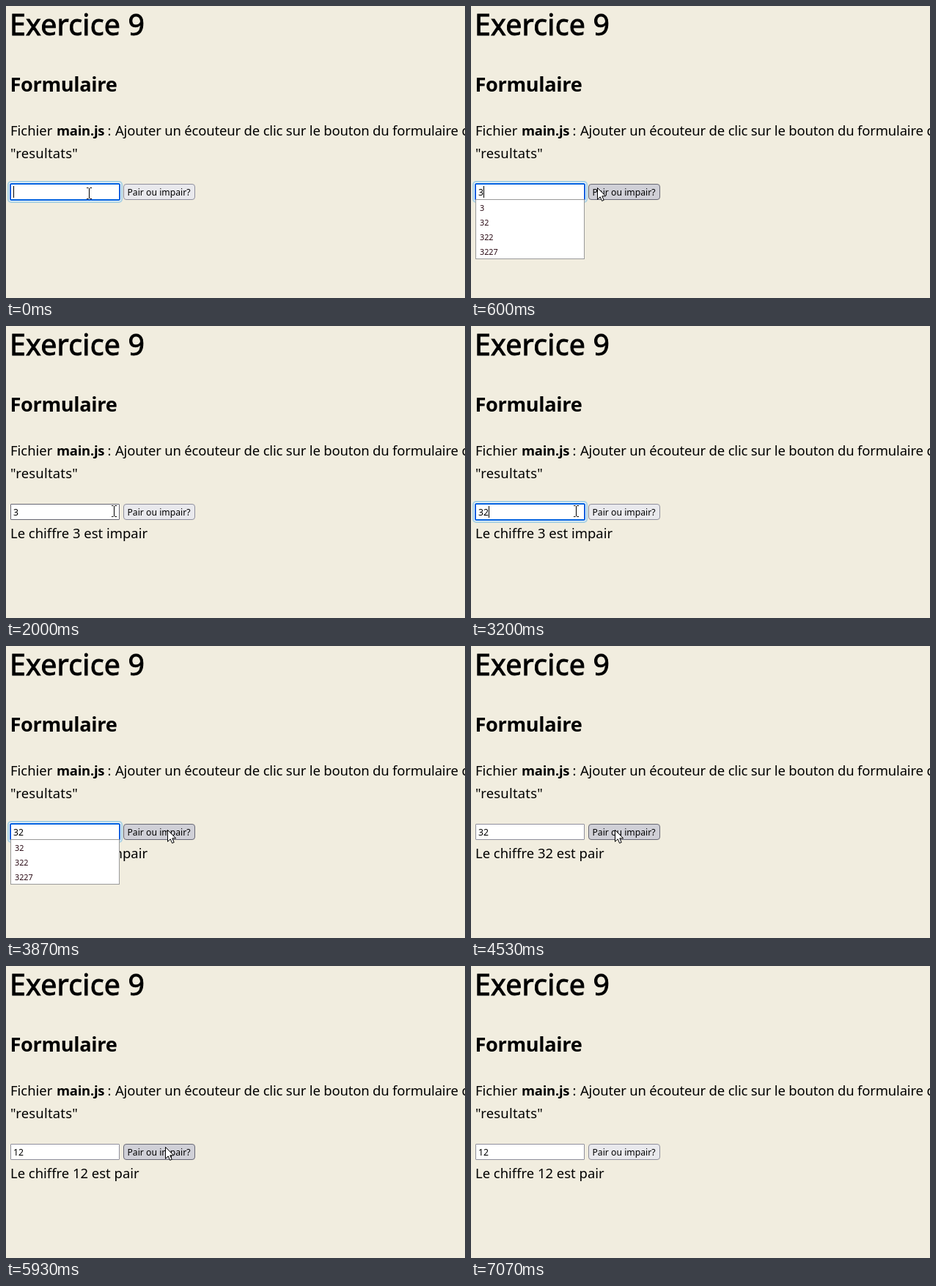
Write an HTML page that moves like this. It is 626 px wide and 399 px high and loops after 7.39 s.

```html
<!DOCTYPE html>
<html lang="fr">
<head>
<meta charset="utf-8">
<title>Exercice 9</title>
<style>
  html, body { margin: 0; width: 100%; height: 100%; overflow: hidden; background: #f1eddf; }
  svg { display: block; cursor: default; }
  text { font-family: "Noto Sans", "Open Sans", sans-serif; font-variant-ligatures: none; white-space: pre; }
  .title { font-size: 39.3px; letter-spacing: .2px; stroke: #000; stroke-width: .9px; }
  .subtitle { font-size: 27.2px; font-weight: 600; letter-spacing: -.36px; }
  .body { font-size: 18.45px; }
  .ui { font-size: 12.2px; }
  .item { font-size: 10.8px; fill: #2a0a14; }
</style>
</head>
<body>
<svg width="626" height="399" viewBox="0 0 626 399">
  <rect width="626" height="399" fill="#f1eddf"/>
  <text class="title" x="5" y="40">Exercice 9</text>
  <text class="subtitle" x="5.5" y="117">Formulaire</text>
  <text class="body" x="6" y="177">Fichier <tspan x="69" font-weight="600" letter-spacing="-.25">main.js</tspan><tspan x="138.6">: </tspan><tspan x="149" letter-spacing="-.16">Ajouter un écouteur de clic sur le bouton du formulaire de la page</tspan></text>
  <text class="body" x="6" y="208" letter-spacing=".22">"resultats"</text>
  <text class="body" id="result" x="6" y="290"></text>

  <g id="ring">
    <rect x="2" y="239" width="157" height="30" rx="5" fill="#a8d0e3"/>
    <rect x="4" y="241" width="153" height="26" rx="3" fill="#fff"/>
  </g>
  <rect id="field" fill="#fff"/>
  <rect id="mark" x="10" y="246" width="14" height="16" fill="#0078d7"/>
  <text class="ui" id="value" x="10" y="259"></text>
  <rect id="caret" y="246" width="1" height="16"/>

  <rect id="button" x="160.5" y="243.5" width="97" height="21" rx="3.5"/>
  <text class="ui" x="165.5" y="259">Pair ou impair?</text>

  <g id="list">
    <rect id="panel" x="6.5" y="264.5" width="148" fill="#fff" stroke="#9a9a9a"/>
    <text class="item" x="12" y="280"></text>
    <text class="item" x="12" y="300"></text>
    <text class="item" x="12" y="320"></text>
    <text class="item" x="12" y="340"></text>
  </g>

  <path id="arrow" d="M.5 .5V16.3L4.2 12.8L6.6 18.4L9.2 17.3L6.8 11.8H11.7Z" fill="#fff" stroke="#000"/>
  <path id="beam" d="M-3 -7.5H-.5M1.5 -7.5H4M-3 7.5H-.5M1.5 7.5H4M.5 -7V7" fill="none" stroke="#000"/>
</svg>
<script>
const LOOP = 7390;
const $ = id => document.getElementById(id);
const beam = (x, y) => ({ pointer: "beam", x, y });
const arrow = (x, y) => ({ pointer: "arrow", x, y });
const press = { button: "active", focus: false, caret: false, list: [] };
const release = result => ({ button: "hover", result });
const over = { button: "hover" };
const out = { button: "idle" };

// Each step: start time, then the properties that change.
const steps = [
  [0, { value: "", focus: true, caret: true, selected: false, list: [], result: "", ...out, ...beam(113, 256) }],
  [270, { value: "3", list: ["3", "32", "322", "3227"] }],
  [400, beam(117, 255)],
  [470, beam(136, 253)],
  [530, arrow(157, 250)],
  [600, { ...arrow(172, 248), ...over }],
  [670, arrow(181, 247)],
  [730, arrow(185, 247)],
  [800, { ...arrow(186, 247), caret: false }],
  [1070, press],
  [1130, release("Le chiffre 3 est impair")],
  [1870, arrow(181, 248)],
  [1930, { ...arrow(157, 248), ...out }],
  [2000, beam(147, 253)],
  [2070, beam(143, 253)],
  [2330, { focus: true, caret: true }],
  [2870, { caret: false }],
  [3200, { value: "32", caret: true }],
  [3270, { list: ["32", "322", "3227"] }],
  [3330, arrow(168, 252)],
  [3400, { ...arrow(206, 252), ...over }],
  [3730, { caret: false }],
  [3800, arrow(217, 251)],
  [3870, arrow(220, 251)],
  [3930, press],
  [4000, release("Le chiffre 32 est pair")],
  [4530, arrow(196, 251)],
  [4600, { ...beam(108, 254), ...out }],
  [4670, beam(24, 255)],
  [4870, { focus: true, caret: true }],
  [4930, { caret: false, selected: true }],
  [5000, beam(27, 255)],
  [5200, beam(112, 254)],
  [5270, arrow(181, 252)],
  [5330, { ...arrow(204, 249), ...over }],
  [5400, arrow(214, 247)],
  [5470, { ...arrow(217, 247), value: "1", selected: false, caret: true, list: ["1", "12"] }],
  [5600, { value: "12", list: ["12"] }],
  [5670, { list: [] }],
  [5870, press],
  [5930, release("Le chiffre 12 est pair")],
  [6270, arrow(212, 248)],
  [6330, arrow(194, 251)],
  [6400, { ...arrow(168, 256), ...out }],
  [6470, beam(141, 261)],
  [6530, arrow(121, 266)],
  [6600, beam(109, 284)],
  [6670, arrow(101, 298)],
  [6730, arrow(96, 318)],
  [6800, arrow(92, 340)],
  [6870, arrow(89, 361)],
  [6930, arrow(87, 380)],
  [7000, arrow(86, 395)],
  [7070, { pointer: "" }]
];

const buttonColors = {
  idle: ["#e9e9ed", "#8f8f9d"],
  hover: ["#d0d0d7", "#676774"],
  active: ["#b1b1b9", "#484851"]
};
const items = document.querySelectorAll(".item");

function set(el, attrs) {
  for (const k in attrs) el.setAttribute(k, attrs[k]);
}
function show(id, on) {
  $(id).style.display = on ? "" : "none";
}

function draw(s) {
  $("result").textContent = s.result;
  $("value").textContent = s.value;
  set($("value"), { fill: s.selected ? "#fff" : "#000" });

  const overField = s.pointer === "beam" && s.y < 266;
  set($("field"), s.focus
    ? { x: 6, y: 243, width: 149, height: 22, rx: 1.5, stroke: "#0060df", "stroke-width": 2 }
    : { x: 6.5, y: 243.5, width: 148, height: 21, rx: .5, stroke: overField ? "#676774" : "#8f8f9d", "stroke-width": 1 });
  show("ring", s.focus);
  show("mark", s.selected);
  show("caret", s.caret);
  set($("caret"), { x: 10 + 7 * s.value.length });

  const [fill, stroke] = buttonColors[s.button];
  set($("button"), { fill, stroke });

  show("list", s.list.length);
  set($("panel"), { height: 20 * s.list.length + 1 });
  items.forEach((el, i) => el.textContent = s.list[i] || "");

  for (const id of ["arrow", "beam"]) {
    show(id, s.pointer === id);
    set($(id), { transform: `translate(${s.x} ${s.y})` });
  }
}

let last = -1;
function tick() {
  const t = performance.now() % LOOP;
  const done = steps.filter(([start]) => start <= t);
  if (done.length !== last) {
    last = done.length;
    draw(Object.assign({}, ...done.map(([, change]) => change)));
  }
  requestAnimationFrame(tick);
}
tick();
</script>
</body>
</html>
```
